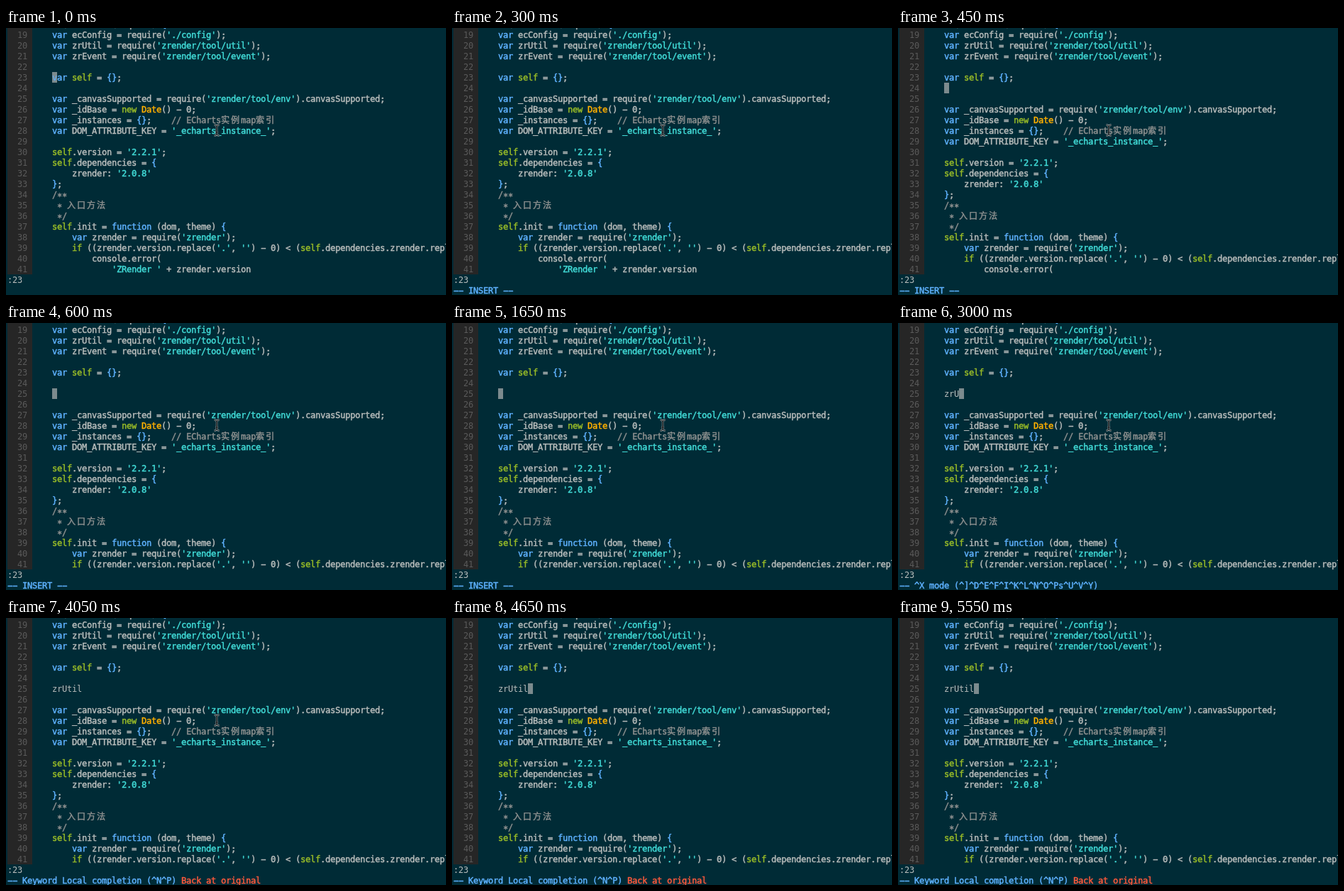
Recreate the animation shown at these times as an HTML page with a canvas. Size 620x376 px, loop 5.65 s.

```html
<!DOCTYPE html>
<html lang="en">
<head>
<meta charset="utf-8">
<title>Editor session</title>
<style>
  html, body { margin: 0; width: 100%; height: 100%; overflow: hidden; background: #002b36; }
  canvas { display: block; }
</style>
</head>
<body>
<canvas id="stage" width="620" height="376"></canvas>
<script>
const ctx = document.getElementById('stage').getContext('2d');
const LOOP = 5650;
const CELL_W = 7, CELL_H = 15, MARGIN = 2, BASELINE = 12;
const GUTTER = 5, INDENT = GUTTER + 4;
const FIRST_LINE = 18, TOP_ROW = -1, ROWS = 23;
const HEAVY = 0.45;

const color = {
  back: '#002b36', gutter: '#262626', number: '#5a5a5a',
  text: '#b8bcbb', comment: '#8f9190', string: '#42dcd8',
  ident: '#5fb2ff', keyword: '#98bb28', type: '#ffb000',
  message: '#5fb2ff', warning: '#ff5a3c', cursor: '#7c8b8e'
};

const source = `define(function (require) {
    var ecConfig = require('./config');
    var zrUtil = require('zrender/tool/util');
    var zrEvent = require('zrender/tool/event');

    var self = {};

    var _canvasSupported = require('zrender/tool/env').canvasSupported;
    var _idBase = new Date() - 0;
    var _instances = {};    // ECharts实例map索引
    var DOM_ATTRIBUTE_KEY = '_echarts_instance_';

    self.version = '2.2.1';
    self.dependencies = {
        zrender: '2.0.8'
    };
    /**
     * 入口方法
     */
    self.init = function (dom, theme) {
        var zrender = require('zrender');
        if ((zrender.version.replace('.', '') - 0) < (self.dependencies.zrender.replace('.', '') - 0)) {
            console.error(
                'ZRender ' + zrender.version`.split('\n');

const syntax = new RegExp([
  /(?<comment>\/\/.*|\/\*.*|^ +\*.*)/,
  /(?<string>'[^']*')/,
  /(?<ident>\b(?:var|function)\b|[{}])/,
  /(?<keyword>\b(?:new|self|if)\b)/,
  /(?<type>\bDate\b)/,
  /(?<text>\w+|.)/
].map(part => part.source).join('|'), 'g');

// Terminal-style wide dash and centred asterisk.
const glyphs = { '-': '\u2212', '*': '\u2217' };

// Each track lists [start time, value]; a value holds until the next entry.
const tracks = {
  cursorOn: [[0, true], [150, false], [450, true], [1050, false], [1650, true],
             [4050, false], [4650, true], [5100, false], [5550, true]],
  inserted: [[0, 0], [450, 1], [600, 2]],
  typed: [[0, ''], [1800, 'z'], [2100, 'zr'], [2400, 'zrU'], [3300, 'zrUtil']],
  mode: [[0, ''], [300, '-- INSERT --'],
         [3000, '-- ^X mode (^]^D^E^F^I^K^L^N^O^Ps^U^V^Y)'],
         [3300, '-- Keyword Local completion (^N^P) ']],
  notice: [[0, ''], [3300, 'Back at original']],
  pointer: [[0, [297, 144]], [4350, [302.5, 153]], [4500, [438.5, 342]], [4650, null]]
};

function valueAt(track, time) {
  return track.filter(([start]) => start <= time).pop()[1];
}

const cellX = col => MARGIN + col * CELL_W;
const cellY = row => MARGIN + row * CELL_H;

// Draws on the terminal grid, wide characters taking two cells; returns the next column.
function print(text, col, row, fill, weight = 0) {
  ctx.fillStyle = ctx.strokeStyle = fill;
  ctx.lineWidth = weight;
  for (const char of text) {
    const place = [glyphs[char] || char, cellX(col), cellY(row) + BASELINE];
    if (char !== ' ') {
      ctx.fillText(...place);
      if (weight) ctx.strokeText(...place);
    }
    col += char > '\u2e80' ? 2 : 1;
  }
  return col;
}

function printCode(line, row) {
  let col = GUTTER;
  for (const { 0: token, groups } of line.matchAll(syntax)) {
    const kind = Object.keys(groups).find(name => groups[name] !== undefined);
    col = print(token, col, row, color[kind], HEAVY);
  }
}

function drawCursor(col, row, char) {
  ctx.fillStyle = color.cursor;
  ctx.fillRect(cellX(col), cellY(row), CELL_W, CELL_H);
  print(char, col, row, color.ident);
}

function drawPointer([x, y]) {
  ctx.beginPath();
  for (const side of [-1, 1]) {
    ctx.moveTo(x + side * 3.5, y - 7.5);
    ctx.quadraticCurveTo(x, y - 7.5, x, y - 5);
    ctx.lineTo(x, y + 5);
    ctx.quadraticCurveTo(x, y + 7.5, x + side * 3.5, y + 7.5);
  }
  ctx.moveTo(x - 2, y + 3);
  ctx.lineTo(x + 2, y + 3);
  ctx.lineWidth = 2.6;
  ctx.strokeStyle = '#a0a8aa';
  ctx.stroke();
  ctx.lineWidth = 1;
  ctx.strokeStyle = '#101416';
  ctx.stroke();
}

function draw(time) {
  const now = {};
  for (const name in tracks) now[name] = valueAt(tracks[name], time);

  ctx.fillStyle = color.back;
  ctx.fillRect(0, 0, 620, 376);
  ctx.fillStyle = color.gutter;
  ctx.fillRect(MARGIN, 0, GUTTER * CELL_W, cellY(ROWS));
  ctx.font = '12px "DejaVu Sans Mono", "Noto Sans CJK SC", "Noto Sans CJK", monospace';
  ctx.lineJoin = 'round';

  const lines = [...source];
  lines.splice(6, 0, ...Array(now.inserted).fill(''));
  lines.slice(0, ROWS - TOP_ROW).forEach((line, i) => {
    print(String(FIRST_LINE + i), 2, TOP_ROW + i, color.number);
    printCode(line, TOP_ROW + i);
  });

  const cursorRow = 4 + now.inserted;
  const cursorCol = print(now.typed, INDENT, cursorRow, color.text);
  if (now.cursorOn) drawCursor(cursorCol, cursorRow, now.inserted ? ' ' : 'v');

  print(':23', 0, ROWS, color.text);
  const end = print(now.mode, 0, ROWS + 1, color.message, HEAVY);
  print(now.notice, end, ROWS + 1, color.warning, HEAVY);

  if (now.pointer) drawPointer(now.pointer);
}

const begin = performance.now();
function tick() {
  draw((performance.now() - begin) % LOOP);
  requestAnimationFrame(tick);
}
tick();
</script>
</body>
</html>
```
